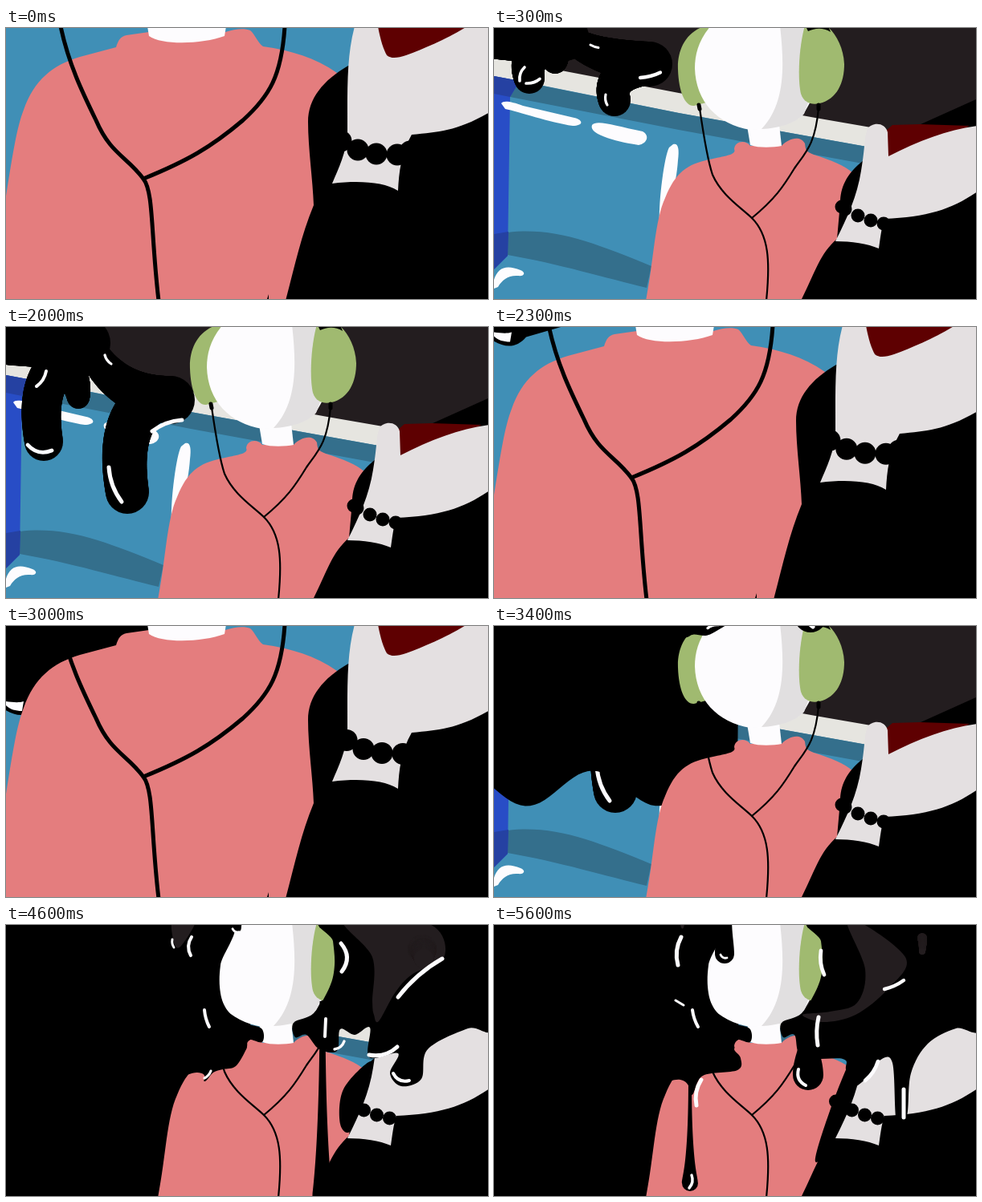
An HTML page with a canvas that plays this animation: 600x338 px, repeating every 5.7 s.

```html
<!DOCTYPE html>
<html lang="en">
<head>
<meta charset="utf-8">
<title>Slime on the train</title>
<style>
html, body { margin: 0; width: 100%; height: 100%; overflow: hidden; background: #000; }
canvas { display: block; width: 100vw; height: 100vh; }
</style>
</head>
<body>
<canvas id="stage" width="600" height="338"></canvas>
<script>
const ctx = document.getElementById('stage').getContext('2d');
const LOOP = 5700, STEP = 100;
const CUT = { wide: 300, close: 2200, flood: 3300 };
const C = {
  dark: '#231d1f', blue: '#408fb6', teal: '#346f8c', royal: '#284dc6', navy: '#2541a2',
  strip: '#e6e5e0', pink: '#e47d7e', green: '#a0ba70', white: '#fdfcfe', grey: '#e1dfe0',
  skin: '#e4e0e1', red: '#5e0001', ink: '#000'
};

const clamp = v => Math.max(0, Math.min(1, v));
const mix = (a, b, k) => a + (b - a) * k;
const span = (t, a, b) => clamp((t - a) / (b - a));

function keyed(t, times, ...poses) {
  let i = 0;
  while (i < times.length - 2 && t > times[i + 1]) i++;
  const k = span(t, times[i], times[i + 1]);
  return poses[i].map((v, j) => mix(v, poses[i + 1][j], k));
}

function fill(d, color) {
  ctx.fillStyle = color;
  ctx.fill(new Path2D(d));
}

function line(d, width) {
  ctx.strokeStyle = C.ink;
  ctx.lineWidth = width;
  ctx.stroke(new Path2D(d));
}

function disc(x, y, r) {
  ctx.beginPath();
  ctx.arc(x, y, r, 0, 7);
  ctx.fill();
}

// Closed smooth curve through flat x,y pairs
function blob(p, color) {
  const n = p.length / 2;
  const at = i => { const j = (i + n) % n * 2; return [p[j], p[j + 1]]; };
  ctx.beginPath();
  ctx.moveTo(p[0], p[1]);
  for (let i = 0; i < n; i++) {
    const [a, b, c, d] = [at(i - 1), at(i), at(i + 1), at(i + 2)];
    ctx.bezierCurveTo(b[0] + (c[0] - a[0]) / 6, b[1] + (c[1] - a[1]) / 6,
      c[0] - (d[0] - b[0]) / 6, c[1] - (d[1] - b[1]) / 6, c[0], c[1]);
  }
  ctx.fillStyle = color;
  ctx.fill();
}

// Curved, tapering arms; rows of x0,y0,cx,cy,x1,y1,r0,r1
function limbs(rows, color) {
  ctx.fillStyle = color;
  for (let i = 0; i < rows.length; i += 8) {
    const [x0, y0, cx, cy, x1, y1, r0, r1] = rows.slice(i, i + 8);
    for (let k = 0; k <= 1; k += 1 / 64) {
      disc(mix(mix(x0, cx, k), mix(cx, x1, k), k), mix(mix(y0, cy, k), mix(cy, y1, k), k), mix(r0, r1, k));
    }
  }
}

function drip(x, top, neck, y, r) {
  if (y < top - r) return;
  ctx.beginPath();
  ctx.moveTo(x - neck, top);
  ctx.bezierCurveTo(x - neck, y - r * 2, x - r, y - r, x - r, y);
  ctx.arc(x, y, r, Math.PI, 0, true);
  ctx.bezierCurveTo(x + r, y - r, x + neck, y - r * 2, x + neck, top);
  ctx.fillStyle = C.ink;
  ctx.fill();
}

// Rows of x0,y0,x1,y1,bend; longer ones are thicker
function glints(g) {
  ctx.strokeStyle = C.white;
  for (let i = 0; i < g.length; i += 5) {
    const [x0, y0, x1, y1, bend] = g.slice(i, i + 5);
    const dx = x1 - x0, dy = y1 - y0;
    ctx.lineWidth = Math.min(5, 2 + Math.hypot(dx, dy) * 0.09);
    ctx.beginPath();
    ctx.moveTo(x0, y0);
    ctx.quadraticCurveTo((x0 + x1) / 2 - dy * bend, (y0 + y1) / 2 + dx * bend, x1, y1);
    ctx.stroke();
  }
}

// ---- first spill, upper left ----
const spillA = [
  -10, 2, 50, 25, 88, 22, 36, 30,
  75, 40, 35, 60, 44, 126, 26, 19,
  75, 45, 78, 70, 76, 84, 18, 15,
  98, 30, 125, 72, 194, 90, 16, 28,
  190, 95, 140, 115, 150, 180, 24, 20
];
const spillB = [
  -10, 10, 50, 18, 98, 20, 36, 32,
  70, 45, 35, 70, 47, 143, 26, 24,
  75, 50, 90, 70, 90, 88, 22, 14,
  105, 25, 135, 85, 205, 91, 18, 30,
  175, 95, 138, 125, 151, 206, 30, 27
];
const sheenA = [38, 98, 32, 132, 0.25, 40, 138, 57, 127, 0.2, 182, 124, 207, 111, 0.1,
  139, 166, 141, 192, 0.2, 120, 42, 130, 49, 0.1];
const sheenB = [50, 55, 38, 74, -0.2, 27, 147, 57, 154, 0.35, 182, 130, 219, 116, -0.15,
  128, 175, 144, 218, 0.15, 123, 35, 131, 46, 0.2];
const halfUp = (list, row) => list.map((v, i) => i % row < row - (row > 5 ? 2 : 1) && i % row % 2 ? v * 0.5 : v);
const spillTimes = [CUT.wide, 1000, 2000];

function spill(t) {
  limbs(keyed(t, spillTimes, halfUp(spillA, 8), spillA, spillB), C.ink);
  glints(keyed(t, spillTimes, halfUp(sheenA, 5), sheenA, sheenB));
}

// ---- the flood: a fixed edge plus a part that runs ----
const floodTimes = [3900, 4600, 5600];

const cheek = [150, -9, 279, -9, 267, 50, 267, 85, 276, 107, 294, 122, 318, 129, 319, 146, 302, 143, 299, 155];
const hairA = [281, 167, 265, 175, 248, 174, 238, 178, 205, 185];
const hairB = [286, 176, 270, 180, 258, 184, 247, 195, 238, 184];
const hairC = [307, 166, 303, 181, 260, 188, 246, 212, 232, 193];

const strand = [402, -9, 407, 20, 409, 50, 403, 77, 383, 110, 358, 122, 360, 140, 374, 137];
const curtainA = [390, 150, 408, 140, 405, 114, 464, 123, 470, 140, 490, 143, 505, 122, 523, 122,
  492, 154, 515, 158, 550, 138];
const curtainB = [390, 155, 412, 157, 416, 130, 434, 137, 453, 128, 452, 165, 488, 160, 478, 185,
  492, 201, 517, 192, 525, 155];
const curtainC = [384, 165, 434, 167, 438, 180, 441, 205, 465, 190, 480, 169, 496, 172, 501, 245,
  514, 238, 519, 185, 540, 148];

const sleeveA = [458, 163, 424, 183, 422, 200, 436, 222, 450, 190];
const sleeveB = [454, 170, 420, 205, 416, 248, 430, 256, 448, 205];
const sleeveC = [446, 165, 418, 232, 400, 295, 428, 266, 440, 215];

const gapA = [430, -9, 450, 60, 440, 101, 418, 93, 406, 113, 466, 122, 462, 103, 475, 70, 485, -9];
const gapB = [420, -9, 456, 40, 456, 95, 458, 112, 464, 120, 484, 85, 505, 62, 546, 38, 525, -2];
const gapC = [440, -9, 462, 55, 452, 97, 418, 108, 384, 112, 410, 121, 450, 112, 490, 80, 512, 40];

const shineA = [198, 30, 198, 54, -0.3, 240, 40, 233, 65, 0.1, 245, 106, 252, 131, 0, 266, 166, 279, 162, -0.2,
  417, 20, 423, 56, -0.3, 388, 102, 391, 148, 0, 402, 136, 405, 140, 0.5, 502, 127, 517, 93, 0.1,
  522, 138, 530, 124, 0.3, 510, 8, 528, 4, -0.1];
const shineB = [207, 18, 209, 28, 0.2, 231, 15, 230, 38, 0.3, 247, 106, 253, 127, 0.1, 247, 191, 255, 182, 0.2,
  417, 23, 418, 58, -0.4, 398, 117, 397, 139, 0, 409, 155, 421, 145, 0.3, 452, 162, 487, 152, 0.25,
  482, 185, 502, 194, 0.4, 488, 90, 543, 42, -0.1];
const shineC = [226, 94, 236, 100, 0, 233, 15, 229, 50, 0.2, 247, 106, 254, 127, 0.1, 252, 225, 258, 193, -0.2,
  407, 32, 411, 62, 0.15, 404, 115, 403, 150, 0.1, 379, 180, 388, 200, 0.4, 462, 194, 478, 170, 0.15,
  510, 205, 510, 240, 0, 486, 80, 510, 69, 0.1];

function mass(t) {
  const y = mix(130, 420, span(t, CUT.flood, 3700));
  ctx.beginPath();
  ctx.moveTo(-9, -9);
  for (let x = -9; x <= 305; x += 6) ctx.lineTo(x, y + 22 * Math.sin(x / 26));
  ctx.lineTo(305, -9);
  ctx.fillStyle = C.ink;
  ctx.fill();
}

function flood(t) {
  const pose = (...set) => keyed(t, floodTimes, ...set);
  const early = span(t, 3900, 4600), late = span(t, 4600, 5600);
  ctx.save();
  ctx.translate(0, -210 * (1 - span(t, CUT.flood, 3750)));
  blob([...cheek, ...pose(hairA, hairB, hairC), 150, 190], C.ink);
  blob([...strand, ...pose(curtainA, curtainB, curtainC), 575, 129, 610, 124, 610, -9], C.ink);
  blob(pose(gapA, gapB, gapC), C.dark);
  limbs(keyed(t, [4600, 5600], [518, 30, 520, 30, 520, 42, 18, 12], [533, 16, 534, 22, 533, 33, 6, 4]), C.dark);
  if (early < 1) {
    const lift = 40 * early;
    blob([235, 20 - lift, 246, 4 - lift, 262, -6 - lift, 250, 19 - lift, 237, 32 - lift], C.green);
  }
  blob(pose([196, -9, 201, 40, 211, 54, 242, -9], [208, -9, 209, 22, 218, 26, 237, -9],
    [231, -9, 233, 3, 236, 3, 238, -9]), C.dark);

  const u = (t - 3900) / 700;
  const fall = u < 0 ? 230 + 110 * u : 230 + 60 * u + 100 * u * u;
  const thread = 3.5 * (1 - span(t, 4700, 5200));
  if (thread > 0) {
    drip(394, 95, thread, fall, 20);
    glints([388, fall - 21, 397, fall + 13, 0.4]);
  }
  if (late > 0) {
    const y = mix(188, 322, late);
    drip(244, 190, 2, y, 10);
    if (y > 205) glints([243, y + 6, 246, y - 10, 0.3]);
    drip(391, 145, 10, mix(145, 187, late), mix(8, 19, late));
  }
  const f = span(t, 4300, 5600), y = mix(-6, 36, f), r = mix(4, 12, f);
  drip(287, -9, 9, y, r);
  glints([282, y + 1, 290, y + 5, 0.4]);
  glints(pose(shineA, shineB, shineC));
  ctx.restore();
}

// ---- wide shot ----
function carriage() {
  ctx.fillStyle = C.dark;
  ctx.fillRect(0, 0, 600, 338);
  fill('M0 37L230 81L400 112L475 125V160L0 70Z', C.strip);
  fill('M0 60L32 66L230 106L475 150V338H0Z', C.blue);
  fill('M30 66L230 106L475 150V172L230 127L20 86Z', C.teal);
  fill('M17 255C75 248 125 268 196 297L190 324C140 312 80 294 17 283Z', C.teal);
  fill('M0 60L32 66L20 86L17 284L0 301Z', C.royal);
  fill('M0 60L32 66L20 86L0 82ZM0 257L18 254L17 284L0 301Z', C.navy);
  fill('M9 94C12 90 22 92 36 97L100 112C112 115 111 122 98 122C70 118 30 104 14 101Z', C.white);
  fill('M122 121C128 114 150 122 185 129C194 134 191 144 180 146C160 143 117 134 122 121Z', C.white);
  fill('M223 145C229 143 231 150 229 165C227 195 218 230 206 241C205 215 212 160 218 149Z', C.white);
  fill('M0 314C5 298 16 295 33 302C40 305 38 310 30 309C18 308 10 314 5 323L0 325Z', C.white);
}

function listener() {
  fill('M264 -3C238 5 228 28 229 52C230 80 238 98 249 97L268 92V-3Z', C.green);
  fill('M189 340C199 290 200 240 213 212C226 180 240 170 268 164C290 159 302 158 299 151C300 141 313 139 319 147H358C366 138 381 133 387 144C388 152 388 154 398 158C420 165 436 171 447 181L470 200L450 340Z', C.pink);
  fill('M315 122L319 146C330 150 348 149 358 147L355 120Z', C.white);
  fill('M270 -3C255 15 250 32 250 50C251 92 278 120 319 127C350 126 375 118 385 108L395 90L388 -3Z', C.white);
  fill('M356 -3C362 50 362 95 333 126C355 125 375 119 386 107L396 80L388 -3Z', C.grey);
  fill('M387 -3C379 25 378 65 382 82C386 94 396 96 405 94C427 89 436 68 436 45C435 23 424 4 413 -3Z', C.green);
  fill('M389 0H417L419 5C410 -1 399 0 391 4Z', C.ink);
  line('M255 96L256 101M404 96L404 101', 5);
  line('M256 100C261 135 266 165 272 183C283 208 305 222 321 237C342 258 344 290 339 340', 2.2);
  line('M404 100C400 145 388 155 374 175C360 198 350 213 321 237', 2.2);
}

function beads(list, r, dx, dy) {
  ctx.fillStyle = C.ink;
  for (const [x, y] of list) disc(x + dx, y + dy, r);
}

function neighbour(t) {
  const k = span(t, 3750, 4600);
  fill('M460 165C438 182 431 200 431 218L427 263C405 282 400 305 382 340H602V200L500 170Z', C.ink);
  if (t > 3500) blob(keyed(t, floodTimes, sleeveA, sleeveB, sleeveC), C.ink);
  fill('M529 121L602 88V130H529Z', C.ink);
  fill('M488 128L496 121L530 120L592 122L560 140L490 163Z', C.red);
  fill('M425 266C440 236 452 210 457 178C462 150 461 134 465 126C470 117 487 117 490 130L491 160C530 140 565 127 602 122V204C570 226 540 236 486 238C482 250 481 262 479 275C465 269 445 266 425 266Z', C.skin);
  beads([[433, 223], [437, 226], [453, 234], [469, 240], [485, 244]], 8.5, -7.5 * k, -3 * k);
}

function wide(t) {
  const late = t >= CUT.flood;
  carriage();
  spill(t);
  if (late) mass(t);
  if (t > 3600 && t < 4300) {
    fill('M194 302L183 340H192Z', C.blue);
    glints([173, 332, 186, 298, 0.1]);
  }
  listener();
  neighbour(t);
  if (late) flood(t);
}

// ---- close shot ----
function close(t) {
  ctx.fillStyle = C.blue;
  ctx.fillRect(0, 0, 600, 338);
  let slide = 0;
  if (t >= CUT.close) {
    const k = span(t, CUT.close, 3000);
    slide = 7 * k;
    ctx.save();
    ctx.translate(0, -100 * (1 - k));
    fill('M-2 -110H178V60L40 100C28 114 14 114 -2 104Z', C.ink);
    fill('M0 94C8 95 16 96 22 94L20 106C12 106 5 104 0 99Z', C.white);
    ctx.restore();
  }
  fill('M-2 222C8 160 13 125 22 102C35 65 58 46 92 36L137 24C140 15 142 11 150 9L178 5H273C285 1 297 0 304 3C310 8 313 18 320 23C355 28 385 37 412 56L440 340H-2Z', C.pink);
  fill('M176 -2L178 10C195 22 245 20 272 10L274 -2Z', C.white);
  line('M68 -2C78 45 95 80 112 115C130 157 150 160 171 188C184 205 180 255 190 340', 5);
  line('M347 -2C343 60 328 85 295 115C255 149 225 166 171 188', 5);
  fill('M426 47C395 65 376 88 376 117C376 150 382 190 383 221C367 260 360 295 348 340H602V90ZM327 332L325 338H327Z', C.ink);
  fill('M434 -2C424 35 425 75 425 130C424 155 414 175 406 194C440 190 470 192 488 203C489 180 492 155 505 133C540 129 560 129 602 105V-2Z', C.skin);
  fill('M463 -2C466 15 470 27 474 34C480 39 488 37 498 34C520 26 550 13 574 -2Z', C.red);
  beads([[417, 141], [438, 152], [461, 157], [487, 158], [503, 154]], 13.5, slide, slide * 0.2);
}

function frame(now) {
  const t = Math.floor(now % LOOP / STEP) * STEP;
  ctx.lineCap = ctx.lineJoin = 'round';
  if (t < CUT.wide || (t >= CUT.close && t < CUT.flood)) close(t);
  else wide(t);
}

const start = performance.now();
function tick() {
  frame(performance.now() - start);
  requestAnimationFrame(tick);
}
tick();
</script>
</body>
</html>
```
